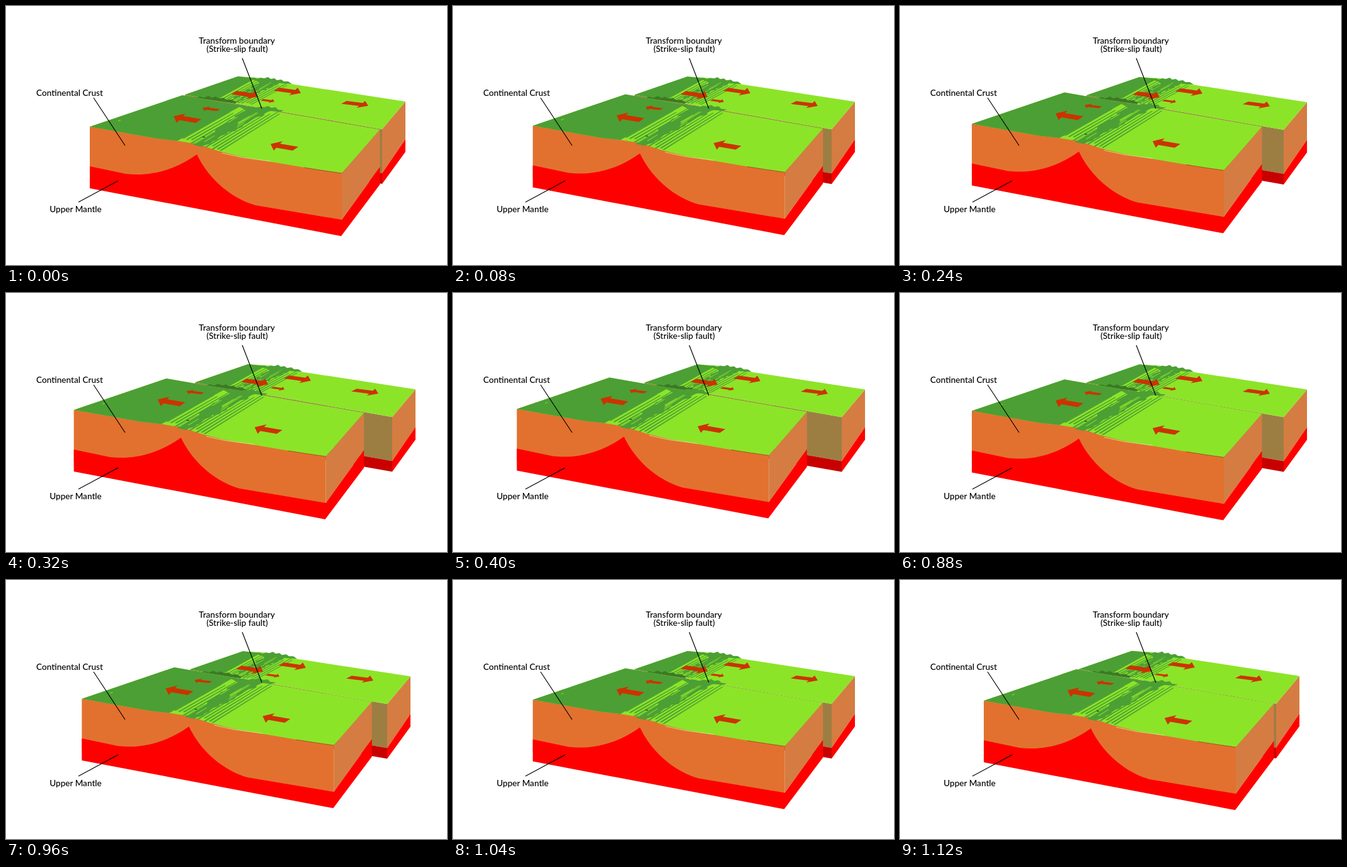
An HTML page for the animation above (2560 ms loop, 700x412 px).

```html
<!DOCTYPE html>
<html lang="en">
<head>
<meta charset="utf-8">
<title>Transform boundary</title>
<style>
@property --k { syntax: "<number>"; inherits: true; initial-value: 0; }
@property --sag { syntax: "<number>"; inherits: true; initial-value: 0; }
html, body { margin: 0; width: 100%; height: 100%; overflow: hidden; background: #fff; }
svg { display: block; width: 700px; height: 412px; animation: slip 2560ms step-end infinite; }
#back { transform: translate(calc(var(--k) * 4px), calc(var(--k) * .3px + var(--sag) * 1px)); }
#front { transform: translate(calc(var(--k) * -6.33px), calc(var(--k) * -1.5px)); }
@keyframes slip {
  0% { --k: 0; --sag: 0; }
  3.125% { --k: 1; --sag: 0; }
  6.25% { --k: 2; --sag: 0; }
  9.375% { --k: 3; --sag: 0; }
  12.5% { --k: 4; --sag: 0; }
  15.625% { --k: 5; --sag: 0; }
  18.75% { --k: 6; --sag: 0; }
  34.375% { --k: 3; --sag: .7; }
  37.5% { --k: 2; --sag: .7; }
  40.625% { --k: 1; --sag: .7; }
  43.75%, 100% { --k: 0; --sag: .7; }
}
.dark { fill: #4c9f34; }
.light { fill: #8ce428; }
.shade { fill: #3b7a25; }
.crust { fill: #e2712f; }
.side { fill: #d57c42; }
.mantle { fill: #f00; }
.inner { fill: #9c7e43; }
.innerMantle { fill: #c80000; }
.arrow { fill: #cc3300; }
.leaders { stroke: #000; stroke-width: 1.2; fill: none; }
text { font: 500 13.6px Lato, "Open Sans", sans-serif; text-anchor: middle; }
</style>
</head>
<body>
<svg viewBox="0 0 700 412">
  <defs>
    <path id="arrow" d="M0 4.5 19 0 15 4 44 9 35 15 9 10.5 5 15Z"/>
  </defs>
  <g id="back">
    <path class="inner" d="M284 141 597 196V266L284 211Z"/>
    <path class="innerMantle" d="M284 211 597 266V283L284 228Z"/>
    <path class="side" d="M597 196 634 152V212L597 266Z"/>
    <path class="mantle" d="M597 266 634 212V232L597 283Z"/>
    <path class="light" d="M284 141 368 112 400 114 452 124 634 152 597 196Z"/>
    <path class="dark" d="M284 141 368 112 396 115 332 149.500Z"/>
    <g id="backRidge"></g>
    <path class="dark" d="M385 115 394 114 399 116 404 114 410 115 416 113 420 116 426 115 430 118 437 117 441 120 448 120 454 124 438 123 418 120 400 120Z"/>
    <path class="shade" d="M300 146 308 144 314 146 321 143 327 146 333 144 338 147 345 146 350 149 358 149 366 153 364 155 330 150Z"/>
    <g id="backArrows"></g>
  </g>
  <g id="front">
    <path class="crust" d="M133 192 240 207 305 216 375 238 533 266V341L133 275Z"/>
    <path class="side" d="M533 266 593.500 196.500V256L533 340Z"/>
    <path class="mantle" d="M133 255 190 267C230 272 270 260 303 236C322 276 358 306 396 317L533 340 593.500 256V284L532 366 133 290Z"/>
    <path class="light" d="M280 142 593.500 196.500 533 266 480 258 375 240 338 231 305 220 272 214.500 240 211 133 192Z"/>
    <path class="dark" d="M133 192 280 142 374 158.500 272 214.500 240 211Z"/>
    <g id="frontRidge"></g>
    <path class="dark" d="M364 157 376 158 382 160 390 160 397 162 404 160 410 161 416 159 421 162 428 161 432 165 441 166 436 168 420 167 402 170 385 168Z"/>
    <path d="M312 208.500h4" stroke="#173b10" stroke-width="1.2"/>
    <path d="M178 183l4-1.500" stroke="#8ce428"/>
    <path d="M343 234 375 241 420 247" stroke="#d9ed9a" fill="none" stroke-width=".8"/>
    <path d="M473 257 505 262 533 266" stroke="#9a5a20" fill="none"/>
    <g id="frontArrows"></g>
  </g>
  <path class="leaders" d="M375 83 406 163M139 146 189 222M115 312 178 278"/>
  <text x="366.500" y="60">Transform boundary</text>
  <text x="367" y="73">(Strike-slip fault)</text>
  <text x="101" y="143">Continental Crust</text>
  <text x="110.500" y="328">Upper Mantle</text>
</svg>
<script>
const NS = "http://www.w3.org/2000/svg";
const byId = id => document.getElementById(id);

function add(parent, tag, attrs) {
  const node = document.createElementNS(NS, tag);
  for (const name in attrs) node.setAttribute(name, attrs[name]);
  parent.append(node);
}

function seeded(seed) {
  return () => (seed = seed * 16807 % 2147483647) / 2147483647;
}

// u runs across the ridge, v from its near end to its far end
function drawRidge(id, near, far, seed) {
  const group = byId(id), random = seeded(seed);
  const mix = (a, b, t) => a + (b - a) * t;
  const at = (u, v) => [0, 1].map(i =>
    mix(mix(near[i], near[i + 2], u), mix(far[i], far[i + 2], u), v).toFixed(1)).join(" ");
  const shape = (kind, points) => add(group, "polygon", { class: kind, points: points.join(" ") });
  const stripe = (kind, u, width, v0, v1) =>
    shape(kind, [at(u, v0), at(u + width, v0), at(u + width * .7, v1), at(u, v1)]);

  for (let u = 0; u < .34; u += .085)
    stripe("dark", u + random() * .03, .04, random() * .1, .75 + random() * .25);

  const left = [], right = [];
  for (let v = 0; v <= 1.001; v += .05) {
    left.push(at(.31 - v * .12 + random() * .1, v));
    right.unshift(at(.53 + v * .14 + random() * .1, v));
  }
  shape("dark", left.concat(right));

  for (let i = 0; i < 9; i++) {
    const v = random() * .7;
    stripe("light", .24 + random() * .38, .025, v, v + .1 + random() * .25);
  }
  for (let u = .62; u < .98; u += .085)
    stripe("dark", u, .04, random() * .08, .85 + random() * .15);
}

function drawArrow(id, x, y, width, height, right) {
  const turn = right ? " rotate(180 22 7.5)" : "";
  add(byId(id), "use", {
    href: "#arrow", class: "arrow",
    transform: `translate(${x} ${y}) scale(${width / 44} ${height / 15})${turn}`
  });
}

drawRidge("backRidge", [332, 149, 388, 158], [394, 115, 452, 124], 41);
drawRidge("frontRidge", [272, 214.5, 340, 231.5], [372, 158.5, 442, 168], 97);

drawArrow("backArrows", 357, 135, 43, 13, true);
drawArrow("backArrows", 425, 130, 43, 12, true);
drawArrow("backArrows", 532, 151, 43, 11, true);
drawArrow("backArrows", 404, 148, 22, 6, true);
drawArrow("frontArrows", 266, 171, 44, 15);
drawArrow("frontArrows", 420, 215, 44, 15);
drawArrow("frontArrows", 312, 160, 28, 7);
</script>
</body>
</html>
```
